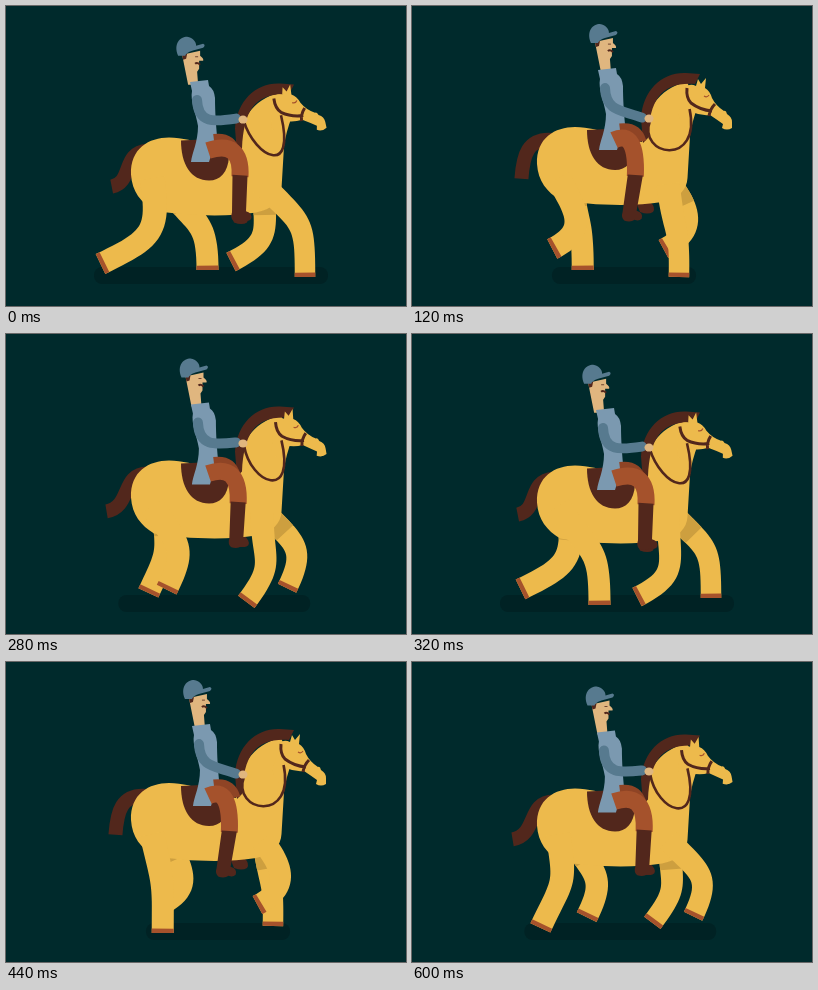
Write an HTML page that moves like this. It is 400x300 px and loops after 640 ms.

```html
<!DOCTYPE html>
<html lang="en">
<head>
<meta charset="utf-8">
<title>Rider</title>
<style>
html, body { margin: 0; width: 100%; height: 100%; overflow: hidden; background: #002a2c; }
svg { display: block; width: 100vw; height: 100vh; }
</style>
</head>
<body>
<svg id="stage" viewBox="0 0 400 300"></svg>
<script>
const LOOP = 640, STEP = 40, BEAT = LOOP / 2;
const C = {
  bg: '#002a2c', shadow: '#002224', coat: '#edba4c', shade: '#cd9f3f', dark: '#52271c',
  rust: '#a5522c', farRust: '#8f4425', jacket: '#7b99b0', arm: '#577a8f', cap: '#577a8f', skin: '#e0b67f'
};
const stage = document.getElementById('stage');

function add(parent, tag, attrs) {
  const el = document.createElementNS('http://www.w3.org/2000/svg', tag);
  for (const k in attrs) el.setAttribute(k, attrs[k]);
  parent.appendChild(el);
  return el;
}
const group = (parent = stage) => add(parent, 'g', {});
const shape = (parent, fill, d = '') => add(parent, 'path', { fill, d });
const line = (parent, stroke, width, d = '') =>
  add(parent, 'path', { fill: 'none', stroke, 'stroke-width': width, d });
const draw = (el, d) => el.setAttribute('d', d);
const move = (el, x, y, extra = '') => el.setAttribute('transform', `translate(${x} ${y}) ${extra}`);
const mix = (a, b, u) => a + (b - a) * u;

// One sway and one sharper dip per step; a higher power makes the dip shorter.
const wave = (time, lag) => Math.cos(2 * Math.PI * (time - lag) / BEAT);
const dip = (time, lag, power) => ((1 + wave(time, lag)) / 2) ** power;

const hind = {
  hip: [146, 172], width: 22, phase: 0, mid: 141, stride: 46.5, even: 0,
  stanceBias: 16, swingBias: 0, lift: 20, heel: 13, tilt: 64, roll: 7,
  hipBack: 9, hipFront: 34, farX: 14, farHip: 12, farTurn: -5
};
const fore = {
  hip: [256, 178], width: 20.5, phase: 0.5, mid: 262, stride: 37, even: 0.5,
  stanceBias: 0, swingBias: -6, lift: 23, heel: 8, tilt: 63, roll: 4,
  hipBack: 0, hipFront: 45, farX: 0, farHip: 2, farTurn: 0
};

// Foot place, foot angle and hip angle; the first half of the cycle swings, the second stands.
function stride(leg, cycle) {
  const swing = cycle < 0.5, s = (cycle * 2) % 1, v = 2 * s - 1;
  const reach = mix(v ** 3, v, leg.even) * leg.stride, late = (1 - s) ** 4;
  const bias = (swing ? leg.swingBias : leg.stanceBias) * (1 - v * v);
  const rise = swing ? leg.heel * (1 - s) + leg.lift * (1 - v ** 4) : leg.heel * s ** 7;
  return {
    x: leg.mid + bias + (swing ? reach : -reach),
    y: 271 - rise,
    foot: leg.tilt * (swing ? 1 - s ** 4 : s ** leg.roll),
    hip: mix(leg.hipBack, leg.hipFront, swing ? 1 - late : late)
  };
}

// Outline of a slightly tapering hose between two places along its curve.
function hose(p, from, to, width) {
  const left = [], right = [];
  for (let i = 0; i <= 24; i++) {
    const t = mix(from, to, i / 24), s = 1 - t;
    const at = k => s ** 3 * p[0][k] + 3 * s * s * t * p[1][k] + 3 * s * t * t * p[2][k] + t ** 3 * p[3][k];
    const tan = k => s * s * (p[1][k] - p[0][k]) + 2 * s * t * (p[2][k] - p[1][k]) + t * t * (p[3][k] - p[2][k]);
    const x = at(0), y = at(1), dx = tan(0), dy = tan(1);
    const r = (width + 3 * Math.max(0, 1 - 1.3 * t)) / 2 / Math.hypot(dx, dy);
    left.push(`${(x - dy * r).toFixed(2)} ${(y + dx * r).toFixed(2)}`);
    right.unshift(`${(x + dy * r).toFixed(2)} ${(y - dx * r).toFixed(2)}`);
  }
  return 'M' + left.concat(right).join('L') + 'Z';
}

function makeLeg(leg, far) {
  const g = group();
  const limb = shape(g, C.coat), hoof = shape(g, C.rust), thigh = far && shape(g, C.shade);
  return time => {
    let { x, y, foot, hip } = stride(leg, (time / LOOP + leg.phase + (far ? 0.5 : 0)) % 1);
    let [hx, hy] = leg.hip;
    if (far) {
      // Far feet land higher on the ground but swing at the same height.
      y -= 7 * Math.min(1, Math.max(0, (y - 255) / 8));
      x += leg.farX;
      hx += leg.farHip;
      hip += leg.farTurn;
    }
    const a = foot * Math.PI / 180, h = hip * Math.PI / 180;
    const bend = 0.56 * Math.hypot(x - hx, y - hy);
    const p = [
      [hx, hy], [hx + bend * Math.sin(h), hy + bend * Math.cos(h)],
      [x + bend * Math.sin(a), y - bend * Math.cos(a)], [x, y]
    ];
    draw(limb, hose(p, 0, 1, leg.width));
    draw(hoof, hose(p, 1 - 4.5 / (3 * bend), 1, leg.width));
    if (far) draw(thigh, hose(p, 0, 0.27, leg.width));
  };
}

add(stage, 'rect', { width: 400, height: 300, fill: C.bg });
const shadow = add(stage, 'rect', { y: 261, height: 17, rx: 8, fill: C.shadow });
const tail = line(stage, C.dark, 14);
const moveLegs = [makeLeg(hind, true), makeLeg(fore, true)];
const farBoot = shape(stage, C.dark, 'M224 196L238 196Q244 201 241 206Q236 209 228 206Z');

const body = group();
shape(body, C.coat, `M125 158C124 132 143 121 163 121C190 121 212 136 230 136
  C232 106 246 82 275 76L286 100Q280 115 278 130L275.500 172C275 184 266 193 250 196
  C220 201 175 199 148 194C135 186 126 175 125 158Z`);
moveLegs.push(makeLeg(hind, false), makeLeg(fore, false));

const tack = group();
shape(tack, C.dark, 'M231 137L229 112C231 84 250 66 274 67L288 68L283 78C250 76 238 92 236 132Z');
shape(tack, C.dark, 'M175 124L215 122L223 140C222 156 214 164 203 164C185 164 175 148 175 124Z');

const head = group();
shape(head, C.coat, `M274 81Q278 77 284 80L286 73L289 78L294 72L293 82Q298 85 300 92Q304 100 312 105
  Q314 104 315 108Q320 111 320 116L320 122Q315 125 310 122L311 118Q304 113 298 109
  Q289 110 280 106L276 126L266 110Z`);
line(head, C.dark, 3, 'M275 82Q274 92 279 97Q288 104 300 105M297 110Q298 103 303 98');
line(head, C.rust, 1.2, 'M292 90Q295 92 297 89');

const face = group();
shape(face, C.skin, 'M183 36L201 32L201 37Q205 40 204 42L200 42L200 50L198 53L199 66L189 66Z');
shape(face, C.dark, 'M183 36L188 35L187 40L184 41Z');
line(face, C.dark, 2, 'M196 45Q198 43 201 46');
line(face, C.dark, 0.8, 'M196 38L199 38');
shape(face, C.cap, `M179 37C174 25 181 18 188 18C194 19 197 23 197 27L204 25
  Q207 26 204 29L193 32Q187 34 186 37Z`);

const torso = group();
shape(torso, C.jacket, `M186 64L204 62L205 68Q210 71 211 80C211 95 212 106 213 118L205 144L187 144
  C188 135 194 124 194 108C192 95 186 83 188 73Z`);
const farThigh = line(stage, C.farRust, 13);
const thigh = line(stage, C.rust, 17);
const boot = shape(stage, C.dark);
const rein = line(stage, C.dark, 2.6);
const sleeve = line(stage, C.arm, 10);
sleeve.setAttribute('stroke-linecap', 'round');
const hand = add(stage, 'ellipse', { rx: 4.5, ry: 4, fill: C.skin });

function moveHorse(time, drop) {
  const spread = dip(time, 0, 4), left = 140 - 52 * spread;
  shadow.setAttribute('x', left);
  shadow.setAttribute('width', 284 + 38 * spread - left);
  moveLegs.forEach(fn => fn(time));
  [body, tack, farBoot].forEach(el => move(el, 0, drop));

  const curl = dip(time, -12, 2);
  draw(tail, `M142 ${134 + drop}C115 ${131 + 1.5 * drop} ${111 + 17 * curl} ${150 + 27 * curl}
    ${105 + 7 * wave(time, 75)} ${175 + 6 * wave(time, 20)}`);
  const nod = dip(time, -8, 3);
  move(head, -6 * nod, 6 * dip(time, 5, 4), `rotate(${-13 * nod} 295 90)`);
}

function moveRider(time, drop) {
  const lean = dip(time, 8, 3), sink = dip(time, 5, 3), kick = dip(time, 0, 1), sway = wave(time, 55);
  move(face, -7 * lean, 13 * lean);
  const tx = -2 * sink, ty = 12 * sink;
  move(torso, tx, ty);

  const kx = 221.5 + 12.5 * kick, ky = 169 + 1.5 * sway;
  const sx = 216 + 18 * kick, sy = 214 + 2.5 * sway;
  draw(thigh, `M202 ${134 + drop}Q${kx + 2} ${123 + drop} ${kx} ${ky + 1}`);
  draw(farThigh, `M208 ${124 + drop}Q224 ${122 + drop} 228 ${136 + drop}`);
  draw(boot, `M${kx - 7.5} ${ky - 1}L${kx + 7.5} ${ky}L${sx + 6} ${sy - 10}
    Q${sx + 13} ${sy - 8} ${sx + 11} ${sy - 2}Q${sx + 8} ${sy + 1} ${sx + 4} ${sy - 1}
    Q${sx} ${sy + 2} ${sx - 6} ${sy}Q${sx - 10} ${sy - 3} ${sx - 8} ${sy - 9}Z`);

  const hx = 237, hy = 111 + 5.5 * sway;
  draw(sleeve, `M${193 + tx} ${82 + ty}C${194 + tx} ${106 + ty} ${210 + tx} ${104 + ty} ${hx - 7} ${hy - 1}`);
  hand.setAttribute('cx', hx);
  hand.setAttribute('cy', hy);
  draw(rein, `M${278 - 3 * kick} ${103 + 0.6 * drop}C290 ${161 + drop}
    ${221 + 28 * kick} 151 ${hx + 1} ${hy + 2}`);
}

function render(time) {
  const drop = 10.5 * dip(time, 0, 4);
  moveHorse(time, drop);
  moveRider(time, drop);
}

function frame(now) {
  render(Math.floor((now % LOOP) / STEP) * STEP);
  requestAnimationFrame(frame);
}
render(0);
requestAnimationFrame(frame);
</script>
</body>
</html>
```
